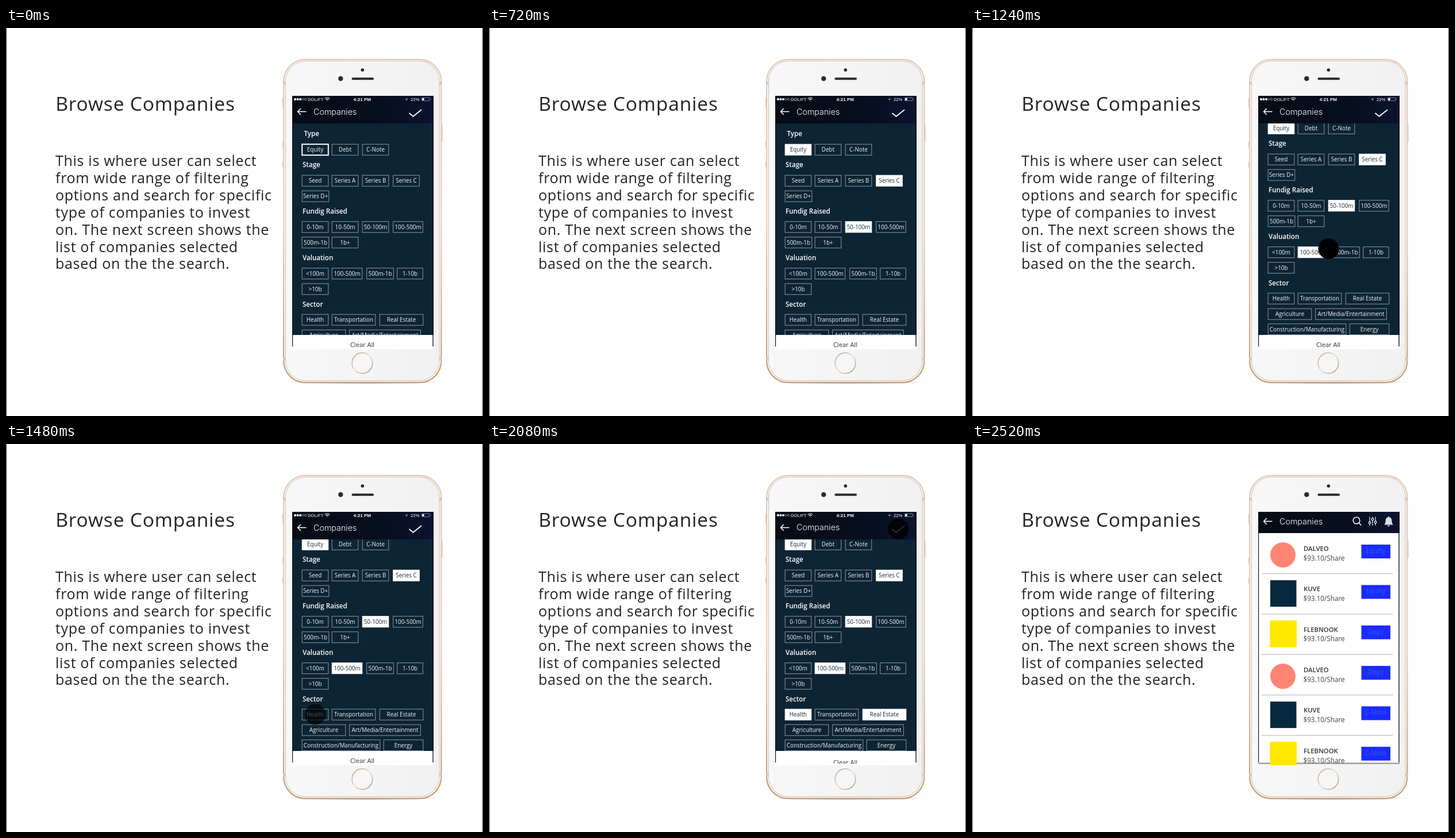
These frames come from a looping animation (830 px wide and 675 px high, 2560 ms). An HTML page:

```html
<!DOCTYPE html>
<html lang="en">
<head>
<meta charset="utf-8">
<title>Browse Companies</title>
<style>
  html, body { margin: 0; width: 100%; height: 100%; overflow: hidden; background: #fff; }
  svg { display: block; width: 830px; height: 675px; font-family: "Open Sans", sans-serif; }
  .title { font-size: 33.5px; letter-spacing: .83px; fill: #222; }
  .body { font-size: 25px; letter-spacing: .69px; fill: #222; }
  .bar { font: 300 14.3px Inter, sans-serif; fill: #fff; }
  .status { font: 7.7px "Liberation Sans", Arial, sans-serif; fill: #fff; }
  .clock { font-size: 8.1px; font-weight: 700; }
  .head { font-size: 11.6px; font-weight: 600; fill: #fff; }
  .opt rect { fill: transparent; stroke: #8c99a3; stroke-width: 1; }
  .opt text { font-size: 9.9px; fill: #f2f4f5; text-anchor: middle; }
  .opt.focus rect { stroke: #fff; stroke-width: 2; }
  .opt.on rect { fill: #fff; stroke: #fff; stroke-width: 1; }
  .opt.on text { fill: #1c2a36; }
  .clear { font-size: 11.1px; fill: #333; text-anchor: middle; }
  .name { font-size: 11.3px; font-weight: 600; fill: #333; }
  .price { font-size: 11.7px; fill: #444; }
  .tag { font-size: 11.8px; fill: #2f5cf2; text-anchor: middle; }
  .line { fill: none; stroke: #fff; stroke-width: 1.5; stroke-linecap: round; stroke-linejoin: round; }
  .thin { stroke-width: 1.1; }
  .thick { stroke-width: 1.9; }
</style>
</head>
<body>
<svg viewBox="0 0 830 675">
  <defs>
    <linearGradient id="gold" x1="0" y1="0" x2="0" y2="1">
      <stop offset="0" stop-color="#dfc7b1"/>
      <stop offset=".5" stop-color="#e8d3be"/>
      <stop offset="1" stop-color="#c0946c"/>
    </linearGradient>
    <linearGradient id="ring" x1="0" y1="0" x2="1" y2="1">
      <stop offset="0" stop-color="#b99f88"/>
      <stop offset=".5" stop-color="#eadfd4"/>
      <stop offset="1" stop-color="#b08e70"/>
    </linearGradient>
    <linearGradient id="face">
      <stop offset="0" stop-color="#f8f8f8"/>
      <stop offset="1" stop-color="#f1f1f2"/>
    </linearGradient>
    <linearGradient id="navy">
      <stop offset="0" stop-color="#060c16"/>
      <stop offset=".6" stop-color="#070e1d"/>
      <stop offset="1" stop-color="#0c1230"/>
    </linearGradient>
    <radialGradient id="shade">
      <stop offset="0" stop-color="#000" stop-opacity=".4"/>
      <stop offset="1" stop-color="#000" stop-opacity="0"/>
    </radialGradient>
    <clipPath id="screen"><rect x="498" y="118" width="246" height="441"/></clipPath>
    <clipPath id="scrollBox"><rect x="498" y="165" width="246" height="369"/></clipPath>
    <clipPath id="barBox"><rect x="498" y="534" width="246" height="22"/></clipPath>
  </defs>

  <rect width="830" height="675" fill="#fff"/>
  <path d="M.5 0V675M829.5 0V675" stroke="#3c3c3c"/>
  <text class="title" x="86.2" y="144">Browse Companies</text>
  <g id="copy"></g>

  <ellipse cx="625" cy="616" rx="136" ry="4" fill="url(#shade)"/>
  <g fill="#d9c3ae">
    <rect x="481" y="121" width="2" height="18"/>
    <rect x="481" y="197" width="2" height="11"/>
    <rect x="481" y="232" width="2" height="11"/>
    <rect x="757.5" y="167" width="2" height="31"/>
  </g>
  <rect x="483" y="54.8" width="274.5" height="562" rx="38" fill="#f7f2ed" stroke="url(#gold)" stroke-width="2"/>
  <rect x="486.5" y="57.5" width="267.5" height="556" rx="35" fill="url(#face)" stroke="#d4c3b3"/>
  <path d="M482 96h4M754 96h4M482 576h4M754 576h4" stroke="#c8c8cf" stroke-width="5"/>
  <circle cx="620.3" cy="73" r="2.8" fill="#25252b"/>
  <circle cx="582.3" cy="88" r="4.2" fill="#252838"/>
  <rect x="601.5" y="86.2" width="38.5" height="4" rx="2" fill="#2a2a2c"/>
  <circle cx="620" cy="583" r="17.8" fill="#f6f6f6" stroke="url(#ring)" stroke-width="1.7"/>

  <g clip-path="url(#screen)">
    <rect x="498" y="118" width="246" height="437" fill="#fff"/>
    <rect x="498" y="554.5" width="246" height="2.2" fill="#969696"/>
    <g id="list"></g>
    <g id="filters">
      <rect x="498" y="150" width="246" height="390" fill="#0d2434"/>
      <g clip-path="url(#scrollBox)"><g id="options"></g></g>
      <rect x="498" y="534" width="246" height="25" fill="#fff"/>
    </g>
    <g clip-path="url(#barBox)"><text id="clear" class="clear" x="620" y="555">Clear All</text></g>
    <rect id="header" x="498" y="118" width="246" height="48" fill="url(#navy)"/>
    <g id="heading">
      <path class="line" d="M522 145.5H507.5M512.5 140.5L507.5 145.5L512.5 150.5"/>
      <text class="bar" x="535" y="150.5">Companies</text>
    </g>
    <g id="before">
      <g fill="#fff">
        <circle cx="503" cy="124" r="2"/><circle cx="507.5" cy="124" r="2"/><circle cx="512" cy="124" r="2"/>
      </g>
      <g fill="none" stroke="#ccc" stroke-width=".6">
        <circle cx="516.5" cy="124" r="1.7"/><circle cx="521" cy="124" r="1.7"/>
        <rect x="723.5" y="121.2" width="13.5" height="5.4" rx="1"/>
        <path d="M738.3 122.8v2.2"/>
      </g>
      <text class="status" x="525" y="126.8">DOLIFT</text>
      <path class="line thin" d="M555 122.6q4 -3.2 8 0M556.7 124.5q2.3 -1.8 4.6 0M558.8 126.3h.4"/>
      <text class="status clock" x="604.5" y="126.9">4:21 PM</text>
      <circle cx="697" cy="124" r="1.8" fill="#77808c"/>
      <text class="status" x="704" y="126.9">22%</text>
      <rect x="724.3" y="122" width="3.2" height="3.8" fill="#fff"/>
      <path class="line thick" d="M702 148.5L708.5 153.8L722.5 142.5"/>
    </g>
    <g id="after">
      <circle class="line" cx="669" cy="133" r="5.8"/>
      <path class="line" d="M673.3 137.3L677 141.2"/>
      <path class="line thin" d="M692 127v14.5M697 127v14.5M702 127v14.5"/>
      <g fill="#0a1024" stroke="#fff" stroke-width="1.2">
        <circle cx="692" cy="137" r="1.8"/><circle cx="697" cy="131" r="1.8"/><circle cx="702" cy="136" r="1.8"/>
      </g>
      <path fill="#dcdde2" d="M717 140.5q2.5 -2 2.5 -6.5q0 -5.5 4 -6.5q0 -1.5 1.5 -1.5t1.5 1.5q4 1 4 6.5q0 4.5 2.5 6.5zM722.8 141.5h4.4q-.5 2 -2.2 2t-2.2 -2z"/>
    </g>
    <path d="M498.5 118V554M743 118V554" stroke="#0a0c12" stroke-width="1.3"/>
  </g>
  <circle id="dot" r="18" opacity="0"/>
</svg>

<script>
const LOOP = 2560;
const $ = id => document.getElementById(id);
const clamp = v => Math.max(0, Math.min(1, v));
const smooth = p => p * p * (3 - 2 * p);
const progress = (t, from, to) => clamp((t - from) / (to - from));

function add(parent, tag, attrs, text) {
  const el = document.createElementNS("http://www.w3.org/2000/svg", tag);
  for (const key in attrs) el.setAttribute(key, attrs[key]);
  if (text) el.textContent = text;
  return parent.appendChild(el);
}

[
  "This is where user can select", "from wide range of filtering",
  "options and search for specific", "type of companies to invest",
  "on. The next screen shows the", "list of companies selected",
  "based on the the search."
].forEach((line, i) => add($("copy"), "text", { class: "body", x: 86, y: 240 + i * 29.9 }, line));

// Option rows: top, then [label, left, width]
const rows = [
  [202, ["Equity", 515, 46], ["Debt", 567, 46], ["C-Note", 620, 46]],
  [256, ["Seed", 515, 46], ["Series A", 567, 46], ["Series B", 620, 46], ["Series C", 673.5, 46]],
  [283, ["Series D+", 515, 47]],
  [336.5, ["0-10m", 515, 46], ["10-50m", 567, 46], ["50-100m", 620, 46], ["100-500m", 673.5, 52]],
  [363.5, ["500m-1b", 515, 47], ["1b+", 567, 46]],
  [417.5, ["<100m", 515, 46], ["100-500m ", 567, 53], ["500m-1b", 627.5, 47], ["1-10b", 680.5, 45]],
  [444.5, [">10b", 515, 46]],
  [498, ["Health", 515, 46], ["Transportation", 567, 76], ["Real Estate", 650, 76]],
  [525, ["Agriculture", 515, 76], ["Art/Media/Entertainment", 597.5, 124]],
  [551.5, ["Construction/Manufacturing", 515, 136], ["Energy", 657, 69]]
];
const heads = [["Type", 188], ["Stage", 242.3], ["Fundig Raised", 323], ["Valuation", 404], ["Sector", 484.5]];
const options = {};

heads.forEach(([label, y], i) =>
  add($("options"), "text", { class: "head", x: i ? 516 : 518.5, y }, label));
for (const [y, ...items] of rows) {
  for (const [label, x, w] of items) {
    const el = add($("options"), "g", { class: "opt" });
    add(el, "rect", { x: x + .2, y: y + .2, width: w - .4, height: 19 });
    add(el, "text", { x: x + w / 2, y: y + 13.2 }, label);
    options[label] = { el, x: x + w / 2, y: y + 9.5 };
  }
}
options.Equity.el.classList.add("focus");

// Company rows
const firms = [
  ["DALVEO", g => add(g, "circle", { cx: 541, cy: 193, r: 22, fill: "#ff8474" })],
  ["KUVE", g => add(g, "rect", { x: 519, y: 166.7, width: 45.5, height: 46, fill: "#08293d" })],
  ["FLEBNOOK", g => add(g, "rect", { x: 518.5, y: 166.3, width: 46.5, height: 46.5, fill: "#ffe800" })]
];
const tags = ["Equity", "Dept", "C-Note"];
const cards = Array.from({ length: 6 }, (_, i) => {
  const card = add($("list"), "g", {});
  const [name, logo] = firms[i % 3];
  logo(card);
  add(card, "text", { class: "name", x: 577, y: 186 }, name);
  add(card, "text", { class: "price", x: 576.5, y: 202.8 }, "$93.10/Share");
  add(card, "rect", { x: 677.5, y: 175, width: 50.5, height: 24, fill: "#1a2bff" });
  add(card, "text", { class: "tag", x: 702.3, y: 190 }, tags[i >> 1]);
  if (i < 5) add(card, "rect", { x: 504, y: 225, width: 228.5, height: 1.2, fill: "#bdb9c9" });
  return card;
});

// Taps: peak time, option, fade-in length
const taps = [
  [120, "Equity", 120], [320, "Series C", 120], [510, "50-100m", 120],
  [850, "100-500m ", 120], [1520, "Health", 120], [1740, "Real Estate", 120],
  [2090, null, 50]
];
const check = { x: 712, y: 148 };

function setDot(x, y, alpha) {
  $("dot").setAttribute("cx", x);
  $("dot").setAttribute("cy", y);
  $("dot").setAttribute("opacity", alpha);
}

function draw(t) {
  const scroll = 37 * smooth(progress(t, 1000, 1240));
  const swap = smooth(progress(t, 2080, 2150));

  $("options").setAttribute("transform", `translate(0 ${-scroll})`);
  setDot(0, 0, 0);
  for (const [peak, label, rise] of taps) {
    const opt = options[label];
    if (opt) opt.el.classList.toggle("on", t >= peak);
    const alpha = Math.min(progress(t, peak - rise, peak), 1 - progress(t, peak, peak + (opt ? 100 : 50)));
    if (alpha > 0) setDot((opt || check).x, opt ? opt.y - scroll : check.y, alpha);
  }
  if (t > 955 && t < 1320) {
    setDot(620.5, 421 - scroll, Math.min(progress(t, 955, 1000), 1 - progress(t, 1240, 1320)));
  }

  $("filters").setAttribute("opacity", 1 - swap);
  $("before").setAttribute("opacity", 1 - swap);
  $("after").setAttribute("opacity", swap);
  $("header").setAttribute("height", 48 - 11 * swap);
  $("heading").setAttribute("transform", `translate(0 ${-11 * swap})`);
  $("clear").setAttribute("transform", `translate(0 ${14 * progress(t, 2050, 2220)})`);

  cards.forEach((card, i) => {
    const x = Math.min(0, -125 - 46 * i + (t - 2160));
    card.setAttribute("transform", `translate(${x} ${i * 70.35})`);
  });
}

const start = performance.now();
function tick(now) {
  draw(Math.max(0, now - start) % LOOP);
  requestAnimationFrame(tick);
}
draw(0);
requestAnimationFrame(tick);
</script>
</body>
</html>
```
